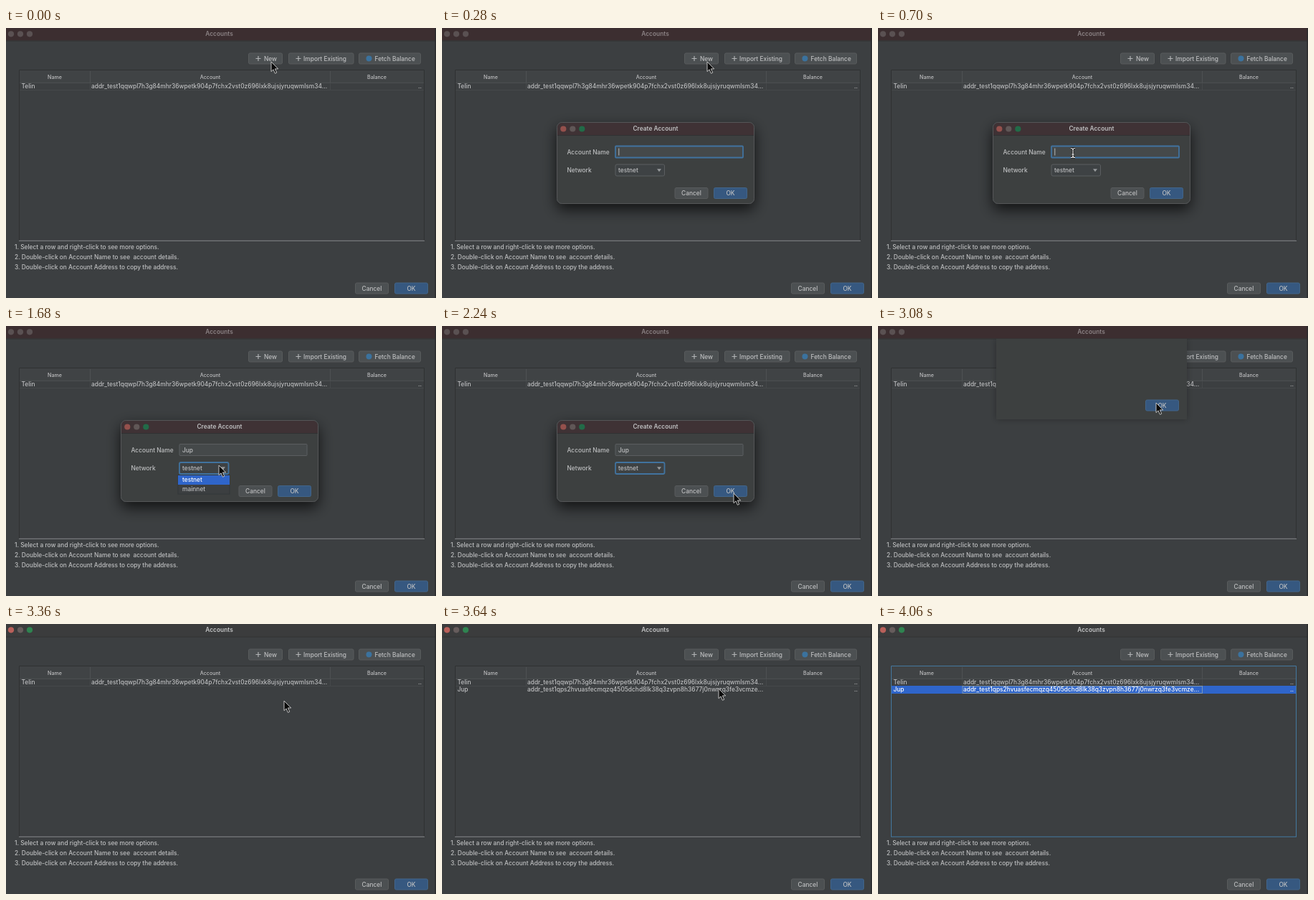
These frames come from a looping animation (600 by 376 pixels, 4.46 s). An HTML page:

```html
<!DOCTYPE html>
<html lang="en">
<head>
<meta charset="utf-8">
<title>Accounts</title>
<style>
  html, body { margin: 0; width: 100%; height: 100%; overflow: hidden; background: #3c3f41; }
  svg { display: block; width: 100%; height: 100%; }
  text { font: 500 8.4px Inter, "Open Sans", sans-serif; fill: #bebfc0; white-space: pre; }
  .header { font-size: 7.1px; }
  .title { font-size: 8.4px; font-weight: 600; }
  .white { fill: #fff; }
</style>
</head>
<body>
<svg id="stage" viewBox="0 0 600 376"></svg>
<script>
const STEP = 140, LAST = 29, LOOP = 4460;
const ADDRESS_1 = "addr_test1qqwpl7h3g84mhr36wpetk904p7fchx2vst0z696lxk8ujsjyruqwmlsm34...";
const ADDRESS_2 = "addr_test1qps2hvuasfecmqzq4505dchd8lk38q3zvpn8h3677j0nwrzq3fe3vcmze...";
const FIRST_NAME = "Telin", NEW_NAME = "Jup";

// Pointer stops: step, x, y
const POINTER = [
  [0, 370, 47], [2, 370, 47], [5, 272, 174], [9, 272, 174], [11, 297, 194], [12, 297, 194],
  [13, 288, 211], [14, 290, 212], [16, 407, 233], [20, 407, 233], [22, 388, 107],
  [25, 388, 107], [26, 386, 90]
];

const rect = (x, y, w, h, fill, extra = "") =>
  `<rect x="${x}" y="${y}" width="${w}" height="${h}" fill="${fill}" ${extra}/>`;
const frame = (x, y, w, h, fill, stroke, radius = 0, width = 1) =>
  rect(x, y, w, h, fill, `stroke="${stroke}" stroke-width="${width}" rx="${radius}"`);
const text = (x, y, content, cls = "", anchor = "start", extra = "") =>
  `<text x="${x}" y="${y}" class="${cls}" text-anchor="${anchor}" ${extra}>${content}</text>`;
const path = (d, stroke, width = 1, fill = "none") =>
  `<path d="${d}" stroke="${stroke}" stroke-width="${width}" fill="${fill}"/>`;
const circle = (x, y, r, fill) => `<circle cx="${x}" cy="${y}" r="${r}" fill="${fill}"/>`;
const plus = x => path(`M${x - 3.5} 42.5h7M${x} 39v7`, "#b0b2b4", 1.2);

function button(x, y, w, label = "", primary = false) {
  const [fill, stroke] = primary ? ["#365880", "#426589"] : ["#4c5052", "#585b5c"];
  return frame(x + .5, y + .5, w - 1, 15, fill, stroke, 2) +
    text(x + w / 2, y + 11, label, "", "middle");
}

function lights(x, y, active, colors = ["#b9605a", "#665c5c", "#2f8350"]) {
  return colors.map((color, i) => circle(x + i * 13, y, 4.1, active ? color : "#5a5152")).join("");
}

function mainWindow(step) {
  const active = step === 17 || step === 18 || step >= 23;
  const selected = step >= 27;
  const edge = selected ? "#43789f" : "#2f3132";
  let out = rect(0, 0, 600, 376, "#3c3f41") +
    rect(0, 0, 600, 17.5, active ? "#3b3c3d" : "#3c2e30") +
    path("M0 18H600", "#313233") + path("M599.2 0V376", "#2a2b2c", 1.4) +
    lights(7, 8.3, active) +
    text(297.5, 11.2, "Accounts", "title", "middle", `style="fill:${active ? "#c4c5c6" : "#8b8284"}"`) +
    button(338, 34.5, 48) + plus(352) + text(360, 45.5, "New") +
    button(394, 34.5, 91.5) + plus(408) + text(415, 45.5, "Import Existing") +
    button(492, 34.5, 87) + circle(506.5, 42.5, 4, "#3b729e") + text(514.5, 45.5, "Fetch Balance");

  out += rect(19, 59, 565, 17, "#404345") +
    path("M19 76.3H583M117.5 60V76M452.5 60V76", "#4e5153") +
    path("M117.5 77V86M452.5 77V86M19 86.5H583", "#484b4d", .8) +
    text(68, 70.6, "Name", "header", "middle") +
    text(285, 70.6, "Account", "header", "middle") +
    text(517.5, 70.6, "Balance", "header", "middle") +
    tableRow(83.7, FIRST_NAME, ADDRESS_1);
  if (selected) {
    out += rect(19, 86, 565, 11, "#2f65ca") + frame(118, 86.5, 334.5, 10, "none", "#8fa3b0", 0, .8);
  }
  if (step >= 25) out += tableRow(94.4, NEW_NAME, ADDRESS_2, selected ? "white" : "");
  out += path("M18.5 296V58.5H583.5V296", edge) +
    path("M18 296.3H584", selected ? edge : "#85888a");

  ["1. Select a row and right-click to see more options.",
   "2. Double-click on Account Name to see  account details.",
   "3. Double-click on Account Address to copy the address."
  ].forEach((line, i) => out += text(12, 308.3 + i * 13.7, line));
  return out + button(487, 354.5, 47, "Cancel") + button(542, 354.5, 47, "OK", true);
}

function tableRow(y, name, address, cls) {
  return text(21.5, y, name, cls) + text(119, y, address, cls) + text(580, y, "..", cls, "end");
}

function createDialog(step) {
  const typed = NEW_NAME.slice(0, Math.max(0, step - 6));
  const inField = step < 11;
  const focus = "#41739f", idle = "#5b5e60";
  let out = `<g filter="url(#dialogShadow)">${frame(160.5, 131.5, 275, 113, "#3c3f41", "#555758", 7)}</g>` +
    path("M161 149V138.5a6.5 6.5 0 0 1 6.5-6.5H428.5a6.5 6.5 0 0 1 6.5 6.5V149Z", "none", 0, "#3f3235") +
    path("M161 149.5H435", "#303132") +
    lights(169.3, 140.5, true, ["#94504c", "#605757", "#226b48"]) +
    text(298, 143.4, "Create Account", "title", "middle") +
    text(174.5, 175.8, "Account Name") +
    frame(242, 164.5, 178, 16, "#45494a", inField ? focus : idle, 1, inField ? 1.8 : 1) +
    text(246, 175.8, typed) +
    text(174.5, 201, "Network") +
    frame(242, 190, 68.5, 16, "#3e4244", inField ? idle : focus, 2, inField ? 1 : 1.8) +
    text(246, 201, "testnet") + path("M300 196.3h6l-3 4Z", "none", 0, "#979a9c") +
    button(324.5, 222, 47, "Cancel") + button(379, 222, 47, "OK", true);
  if (inField) {
    const caret = 246.8 + [0, 4.6, 9.7, 15][typed.length];
    out += path(`M${caret} 167.5v10`, "#c5c6c7", .9);
  }
  if (step >= 12 && step <= 13) {
    out += frame(240, 207.5, 72, 26.5, "#3c3f41", "#333638") +
      rect(240, 208, 72, 13, "#2f65ca") +
      text(246, 217.3, "testnet", "white") + text(246, 230.4, "mainnet");
  }
  return out;
}

function sheet(step) {
  const height = { 19: 42.5, 20: 100, 21: 112, 22: 112 }[step];
  if (!height) return "";
  return `<g clip-path="url(#belowTitle)"><g filter="url(#sheetShadow)">` +
    rect(165, 18, 266, height, "#3c3f41") + `</g>` +
    button(373, height - 9.5, 47, "OK", true) + `</g>`;
}

function pointer(step) {
  if (step >= 28) return "";
  const next = POINTER.findIndex(stop => stop[0] > step);
  const b = POINTER.at(next), a = next > 0 ? POINTER[next - 1] : b;
  const p = b === a ? 1 : (step - a[0]) / (b[0] - a[0]);
  const k = p * p * (3 - 2 * p);
  const x = a[1] + (b[1] - a[1]) * k, y = a[2] + (b[2] - a[2]) * k;
  const beam = "M-3-6.5Q0-6.5 0-4.5Q0-6.5 3-6.5M0-4.5V4.5M-3 6.5Q0 6.5 0 4.5Q0 6.5 3 6.5M-1.5 2h3";
  const shape = step >= 5 && step <= 9
    ? path(beam, "#111", 2.8) + path(beam, "#fff", 1.1)
    : path("M0 0V13.6L3.1 10.8L5.4 16.2L7.7 15.2L5.4 9.9H9.7Z", "#d4d4d4", .9, "#0a0a0a");
  return `<g transform="translate(${x} ${y})">${shape}</g>`;
}

const shadow = (id, dy, blur, opacity) =>
  `<filter id="${id}" x="-20%" y="-60%" width="140%" height="220%">
    <feDropShadow dx="0" dy="${dy}" stdDeviation="${blur}" flood-color="#000" flood-opacity="${opacity}"/>
  </filter>`;
const DEFS = `<defs>${shadow("dialogShadow", 8, 10, .7)}${shadow("sheetShadow", 0, 5, .3)}
  <clipPath id="belowTitle"><rect y="18" width="600" height="358"/></clipPath></defs>`;
const stage = document.getElementById("stage");
const start = performance.now();
let shown = -1;

function draw() {
  const step = Math.min(LAST, Math.floor(((performance.now() - start) % LOOP) / STEP));
  if (step !== shown) {
    shown = step;
    const dialog = step >= 2 && step <= 16 ? createDialog(step) : "";
    stage.innerHTML = DEFS + mainWindow(step) + dialog + sheet(step) + pointer(step);
  }
  requestAnimationFrame(draw);
}
draw();
</script>
</body>
</html>
```
